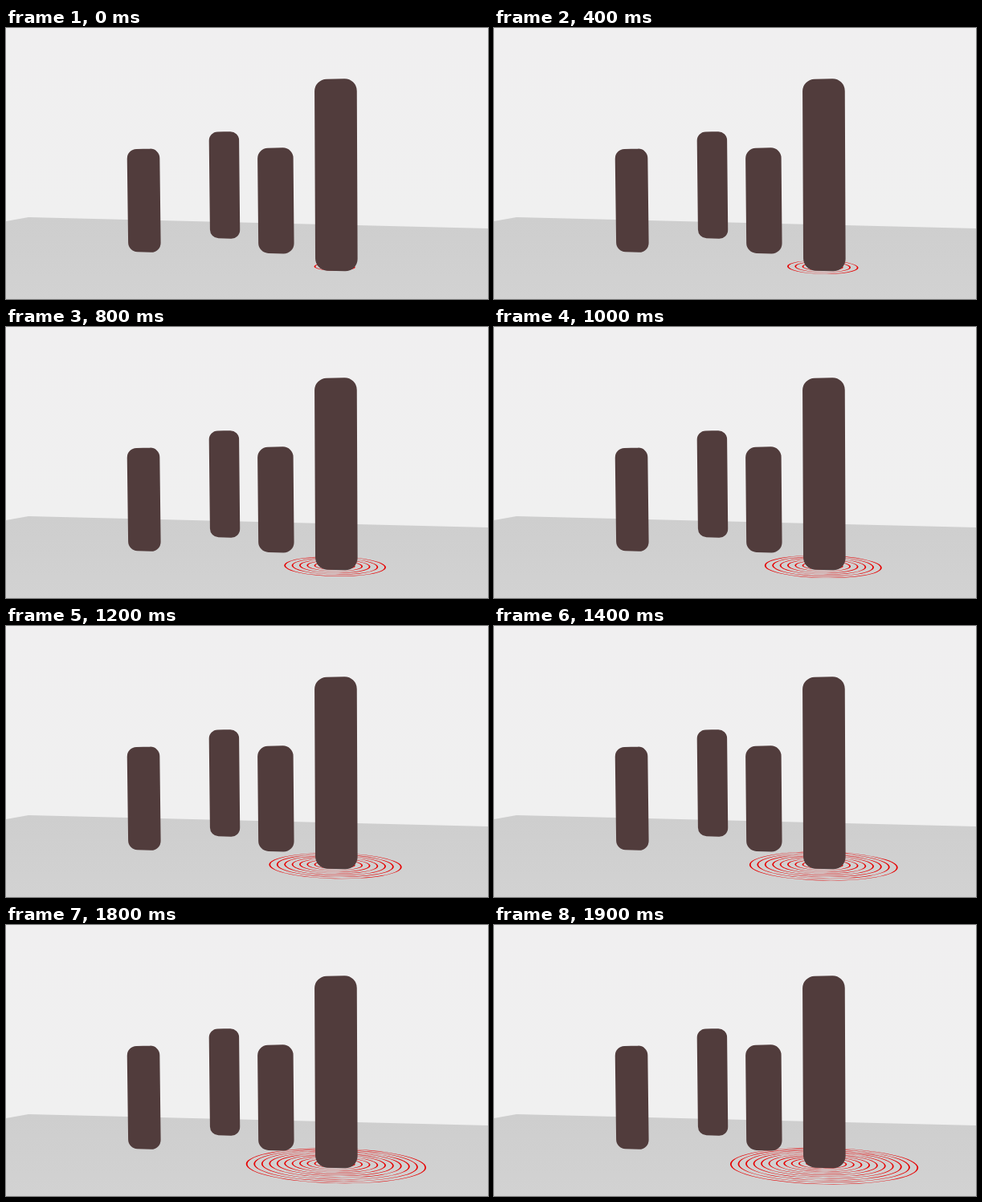
Write an HTML page with a canvas that moves like this. It is 600 px wide and 338 px high and loops after 2 s.

```html
<!DOCTYPE html>
<html lang="en">
<head>
<meta charset="utf-8">
<title>Pillars and ripples</title>
<style>
  html, body { margin: 0; width: 100%; height: 100%; overflow: hidden; background: #f0eff0; }
  canvas { display: block; width: 600px; height: 338px; }
</style>
</head>
<body>
<canvas id="stage" width="600" height="338"></canvas>
<script>
const ctx = document.getElementById('stage').getContext('2d');
const LOOP = 2000, STEP = 100;

function verticalFade(y0, y1, from, to) {
  const fade = ctx.createLinearGradient(0, y0, 0, y1);
  fade.addColorStop(0, from);
  fade.addColorStop(1, to);
  return fade;
}

const wall = verticalFade(0, 245, '#f0eff0', '#f0f0f0');
const floor = verticalFade(236, 338, '#cecece', '#d2d2d2');

function drawRoom() {
  ctx.fillStyle = wall;
  ctx.fillRect(0, 0, 600, 338);
  ctx.fillStyle = floor;
  ctx.beginPath();
  ctx.moveTo(0, 241);
  ctx.lineTo(28, 236);
  ctx.lineTo(600, 250);
  ctx.lineTo(600, 338);
  ctx.lineTo(0, 338);
  ctx.fill();
}

// Perspective enlarges the outer rings slightly.
const ringRadius = age => 25.6 + 4.65 * age + 0.009 * age * age;

// A flat ring on the floor: its line is thick at the sides, thin in front and behind.
function drawRing(r) {
  const cx = 409 + 0.00015 * r * r;
  const cy = 297.8 + 0.0002 * r * r;
  const ry = r * 0.194;
  const tilt = 0.02;
  ctx.beginPath();
  ctx.ellipse(cx, cy, r, ry, tilt, 0, Math.PI * 2);
  ctx.closePath();
  ctx.ellipse(cx, cy, r - 1.8, ry - 0.4, tilt, 0, Math.PI * 2);
  ctx.fill('evenodd');
}

function drawRipples(step) {
  ctx.fillStyle = '#e60404';
  for (let age = step; age >= -2; age -= 2) drawRing(ringRadius(age));
}

// Pillars lean less towards the right; wider ones are nearer and rounder.
function drawPillar(x, top, width, height) {
  const right = x + width, bottom = top + height;
  const lean = edge => 2 - 0.0023 * edge;
  const corners = [
    [x, top],
    [right, top - 0.02 * width],
    [right + lean(right), bottom + 0.03 * width],
    [x + lean(x), bottom]
  ];
  ctx.beginPath();
  ctx.moveTo(x + width / 2, top - 0.01 * width);
  for (let i = 1; i <= 4; i++) {
    ctx.arcTo(...corners[i % 4], ...corners[(i + 1) % 4], 0.29 * width);
  }
  ctx.closePath();
  ctx.fill();
}

function draw(time) {
  drawRoom();
  drawRipples(Math.floor((time % LOOP) / STEP));
  ctx.fillStyle = '#513c3c';
  drawPillar(150.6, 151.2, 40.6, 127.8);
  drawPillar(252.6, 129.7, 37.4, 132.3);
  drawPillar(313, 150, 44.5, 130.6);
  drawPillar(384, 64, 52.7, 238.2);
}

const start = performance.now();
function tick() {
  draw(performance.now() - start);
  requestAnimationFrame(tick);
}
tick();
</script>
</body>
</html>
```
